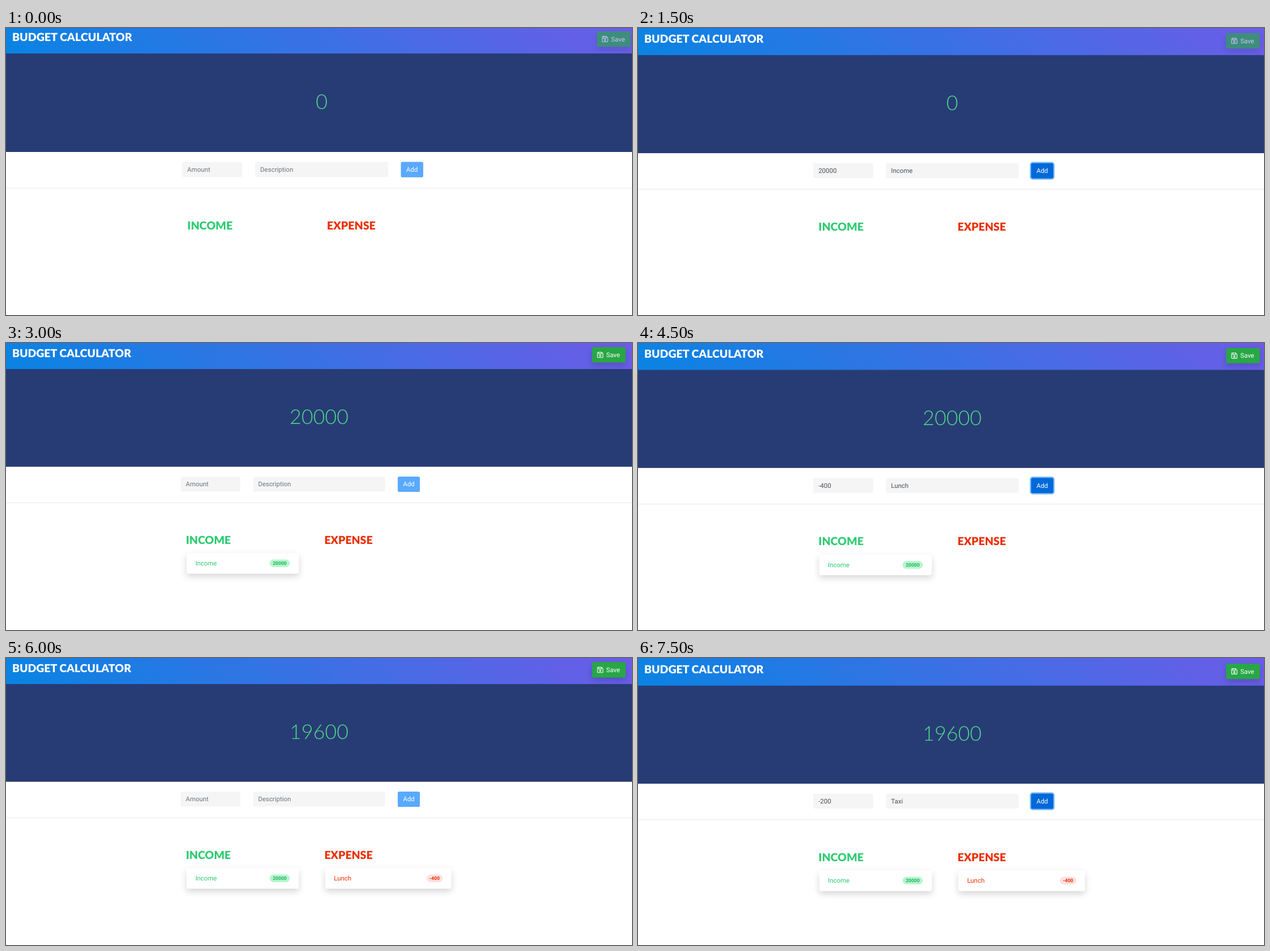
These frames come from a looping animation (1104 by 507 pixels, 8 s). An HTML page:

```html
<!DOCTYPE html>
<html lang="en">
<head>
<meta charset="utf-8">
<title>Budget calculator</title>
<style>
  html, body { margin: 0; width: 100%; height: 100%; overflow: hidden; background: #fff; }
  svg { display: block; width: 100%; height: 100%; }
  text { font: 400 11.5px Roboto, sans-serif; white-space: pre; text-rendering: geometricPrecision; }
  .head { font: 900 19.6px Lato, sans-serif; }
  .total { font: 300 36px Lato, sans-serif; text-anchor: middle; fill: #51d88a; }
  .badge { font-weight: 700; font-size: 8.6px; text-anchor: middle; }
  .field { fill: #f5f5f5; }
  .mid { text-anchor: middle; }
  .lift { filter: drop-shadow(0 5.7px 5.7px rgba(0, 0, 0, .16)); }
  .income { fill: #2ecc71; }
  .expense { fill: #eb2f06; }
</style>
</head>
<body>
<svg viewBox="0 0 1104 507" preserveAspectRatio="none">
  <defs>
    <linearGradient id="sky" gradientUnits="userSpaceOnUse" x1="264" y1="310" x2="840" y2="-266">
      <stop offset="0" stop-color="#0984e3"/>
      <stop offset="1" stop-color="#6c5ce7"/>
    </linearGradient>
  </defs>
  <g id="page">
    <rect y="-10" width="1120" height="56" fill="url(#sky)"/>
    <rect y="45" width="1120" height="174" fill="#273c75"/>
    <rect y="282.5" width="1120" height="1" fill="#e9e9e9"/>
    <text class="head" x="11" y="23.3" fill="#fff">BUDGET CALCULATOR</text>

    <g id="save">
      <rect class="lift" x="1042" y="6" width="59.5" height="27.3" rx="2.9" fill="#28a745"/>
      <g fill="none" stroke="#fff" stroke-width="1.1" stroke-linejoin="round">
        <path d="M1052.6 14.9h6l2.6 2.6v6a1 1 0 0 1-1 1h-7.6a1 1 0 0 1-1-1v-7.6a1 1 0 0 1 1-1z"/>
        <path d="M1053.7 15v3.1h4.6v-3.1"/>
        <circle cx="1056.4" cy="21.3" r="1.3"/>
      </g>
      <text x="1067" y="23.8" fill="#fff">Save</text>
    </g>

    <text id="total" class="total" x="556.6" y="143"></text>

    <rect class="field" x="310.6" y="236.8" width="106" height="26.4" rx="2.5"/>
    <text id="amount" x="319.6" y="254"></text>
    <rect class="field" x="439.4" y="236.8" width="234.6" height="26.4" rx="2.5"/>
    <text id="about" x="448.3" y="254"></text>
    <rect id="add" x="696.4" y="236.6" width="39.4" height="27.2" rx="2.9" stroke-width="4.4" paint-order="stroke"/>
    <text class="mid" x="716.1" y="254" fill="#fff">Add</text>

    <text class="head income" x="319.8" y="356.3">INCOME</text>
    <text class="head expense" x="566" y="356.3">EXPENSE</text>

    <g id="earned">
      <rect class="lift" x="321.2" y="372.7" width="199.4" height="36.8" rx="4" fill="#fff"/>
      <text class="income" x="336.6" y="394.6">Income</text>
      <rect x="468.7" y="384.2" width="35.8" height="13.6" rx="6.8" fill="#b4f8cd"/>
      <text class="badge" x="486.6" y="394.1" fill="#27ae60">20000</text>
    </g>
    <g id="spent">
      <rect class="lift" x="567.5" y="372.7" width="224.3" height="36.8" rx="4" fill="#fff"/>
      <text class="expense" x="583" y="394.6">Lunch</text>
      <rect x="747.5" y="384.2" width="28.7" height="13.6" rx="6.8" fill="#ffe0de"/>
      <text class="badge expense" x="761.9" y="394.1">-400</text>
    </g>
  </g>
</svg>
<script>
  const LOOP = 8000;
  const STEP = 1500;

  // y shift, zoom, total, typed amount, typed description, cards shown
  const steps = [
    [0, 1, '0', '', '', 0],
    [3.1, .9955, '0', '20000', 'Income', 0],
    [1.4, .992, '20000', '', '', 1],
    [2.7, .9955, '20000', '-400', 'Lunch', 1],
    [1.4, .992, '19600', '', '', 2],
    [4, .9955, '19600', '-200', 'Taxi', 2]
  ];

  const el = id => document.getElementById(id);
  const set = (id, attrs) => {
    for (const key in attrs) el(id).setAttribute(key, attrs[key]);
  };

  function fill(id, value, hint) {
    el(id).textContent = value || hint;
    set(id, { fill: value ? '#495057' : '#6c757d' });
  }

  function show([y, zoom, total, amount, about, cards]) {
    set('page', { transform: `translate(0 ${y}) scale(${zoom})` });
    el('total').textContent = total;
    fill('amount', amount, 'Amount');
    fill('about', about, 'Description');
    set('add', amount
      ? { fill: '#0069d9', stroke: '#80bdff' }
      : { fill: '#59a9ff', stroke: 'none' });
    set('save', { opacity: cards ? 1 : .65 });
    set('earned', { visibility: cards > 0 ? 'visible' : 'hidden' });
    set('spent', { visibility: cards > 1 ? 'visible' : 'hidden' });
  }

  let current = -1;
  function tick() {
    const index = Math.floor(performance.now() % LOOP / STEP);
    if (index !== current) show(steps[current = index]);
    requestAnimationFrame(tick);
  }
  tick();
</script>
</body>
</html>
```
